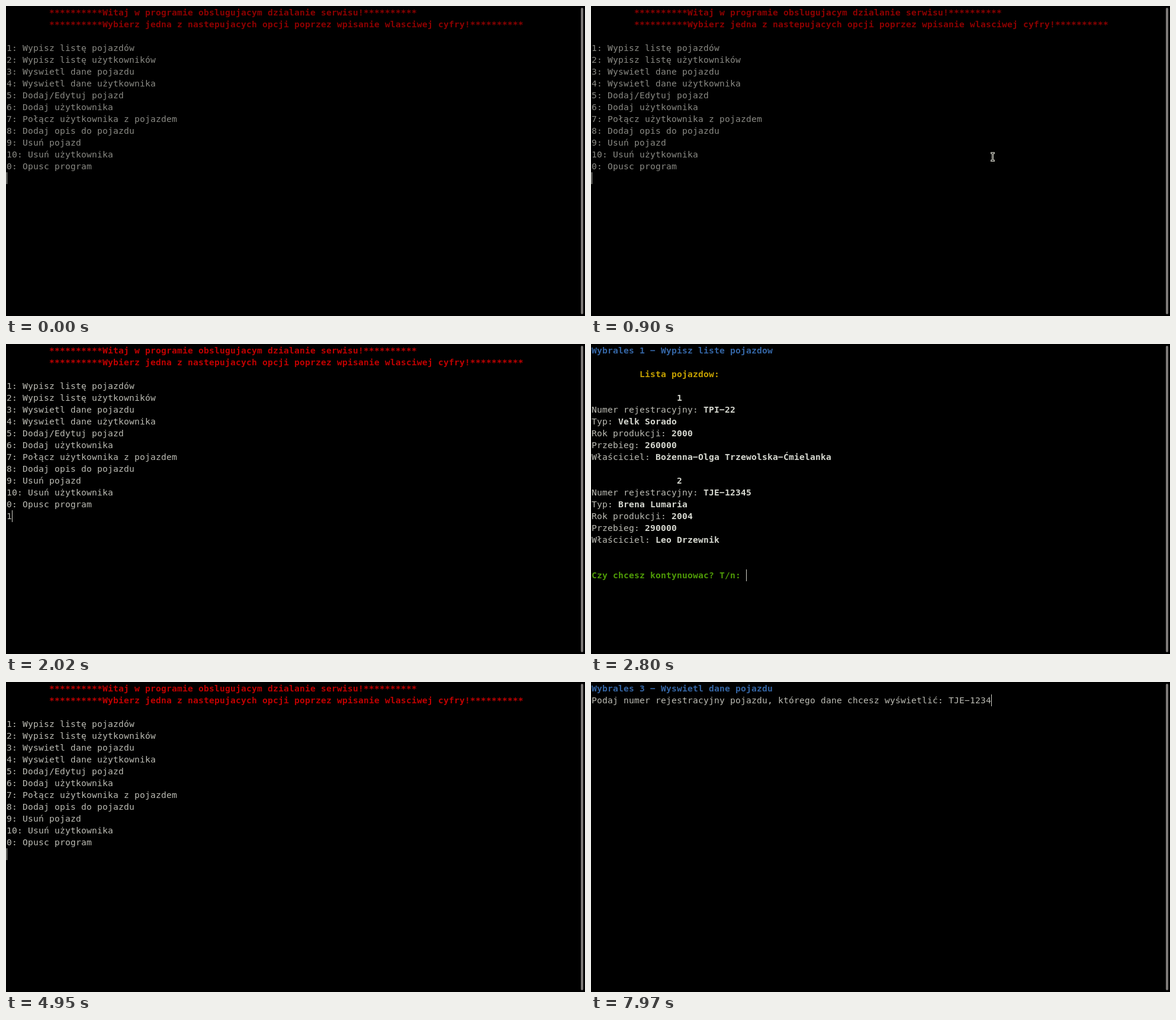
Write an HTML page that moves like this. It is 978 by 524 pixels and loops after 8000 ms.

```html
<!DOCTYPE html>
<html lang="pl">
<head>
<meta charset="utf-8">
<style>
html, body { margin: 0; width: 100%; height: 100%; overflow: hidden; background: #000; }
#stage { position: absolute; left: 0; top: 0; width: 978px; height: 524px; overflow: hidden; }
#text {
  position: absolute; left: 1px; top: 1px; margin: 0; color: #bcbcb4;
  font: 11pt/20px "DejaVu Sans Mono", monospace;
  letter-spacing: calc(9px - 1ch); /* terminal cells are 9px wide */
  font-variant-ligatures: none; white-space: pre;
}
b { font-weight: 700; color: #d6d8d0; }
.red { color: #c00000; }
.blue { color: #3465a4; }
.gold { color: #c4a000; }
.green { color: #4e9a06; }
#caret { position: absolute; width: 1px; height: 20px; background: #d0d0c8; }
#bar { position: absolute; left: 971px; top: 3px; width: 4px; height: 518px; border-radius: 2px; background: #7d7a78; }
#mouse { position: absolute; left: 673px; top: 246px; }
</style>
</head>
<body>
<div id="stage">
  <pre id="text"></pre>
  <div id="caret"></div>
  <div id="bar"></div>
  <svg id="mouse" width="12" height="18" fill="none">
    <path d="M2 2.5H9M5.5 3V15M2 15.5H9" stroke="#e4e4d8" stroke-width="3"/>
    <path d="M2.5 2.5H8.5M5.5 3V15M2.5 15.5H8.5" stroke="#111"/>
  </svg>
</div>
<script>
const $ = id => document.getElementById(id);
const bold = (s, cls = "") => `<b class="${cls}">${s}</b>`;
const stars = "*".repeat(10);
const banner = s => " ".repeat(8) + bold(stars + s + stars, "red");

const menu = [
  banner("Witaj w programie obslugujacym dzialanie serwisu!"),
  banner("Wybierz jedna z nastepujacych opcji poprzez wpisanie wlasciwej cyfry!"),
  "",
  "1: Wypisz listę pojazdów",
  "2: Wypisz listę użytkowników",
  "3: Wyswietl dane pojazdu",
  "4: Wyswietl dane użytkownika",
  "5: Dodaj/Edytuj pojazd",
  "6: Dodaj użytkownika",
  "7: Połącz użytkownika z pojazdem",
  "8: Dodaj opis do pojazdu",
  "9: Usuń pojazd",
  "10: Usuń użytkownika",
  "0: Opusc program",
  ""
].join("\n");

const labels = ["Numer rejestracyjny", "Typ", "Rok produkcji", "Przebieg", "Właściciel"];
const vehicle = (n, ...values) =>
  [" ".repeat(16) + bold(n), ...labels.map((l, i) => `${l}: ${bold(values[i])}`), ""];

const list = [
  bold("Wybrales 1 − Wypisz liste pojazdow", "blue"),
  "",
  " ".repeat(9) + bold("Lista pojazdow:", "gold"),
  "",
  ...vehicle(1, "TPI−22", "Velk Sorado", "2000", "260000", "Bożenna−Olga Trzewolska−Ćmielanka"),
  ...vehicle(2, "TJE−12345", "Brena Lumaria", "2004", "290000", "Leo Drzewnik"),
  "",
  bold("Czy chcesz kontynuowac? T/n: ", "green")
].join("\n");

const ask = "Podaj numer rejestracyjny pojazdu, którego dane chcesz wyświetlić: ";
const details = bold("Wybrales 3 − Wyswietl dane pojazdu", "blue") + "\n" + ask;

// Each scene: start time, text, caret column and row, key times with the typed string
const scenes = [
  { at: 0, text: menu, col: 0, row: 14, typed: "1", keys: [1970] },
  { at: 2570, text: list, col: 29, row: 19, typed: "", keys: [] },
  { at: 4900, text: menu, col: 0, row: 14, typed: "3", keys: [5150] },
  { at: 5600, text: details, col: ask.length, row: 1, typed: "TJE−1234",
    keys: [6620, 6800, 6970, 7220, 7400, 7550, 7700, 7920] }
];
const caretOff = [[3150, 3770], [4370, 4900], [6150, 6620]];
const within = (t, [a, b]) => t >= a && t < b;

let shown = "";
function draw(now) {
  const t = now % 8000;
  const s = scenes.findLast(s => t >= s.at);
  const count = s.keys.filter(k => t >= k).length;
  const html = s.text + s.typed.slice(0, count);
  if (html !== shown) $("text").innerHTML = shown = html;

  // The unfocused window is dimmed, then brightens
  const focus = Math.min(1, Math.max(0, (t - 1250) / 270));
  $("text").style.filter = focus < 1 ? `brightness(${0.73 + 0.27 * focus})` : "none";

  const caret = $("caret").style;
  caret.left = 1 + 9 * (s.col + count) + "px";
  caret.top = 1 + 20 * s.row + "px";
  caret.visibility = caretOff.some(span => within(t, span)) ? "hidden" : "visible";
  $("mouse").style.visibility = within(t, [850, 1500]) ? "visible" : "hidden";
  requestAnimationFrame(draw);
}
draw(performance.now());
</script>
</body>
</html>
```
